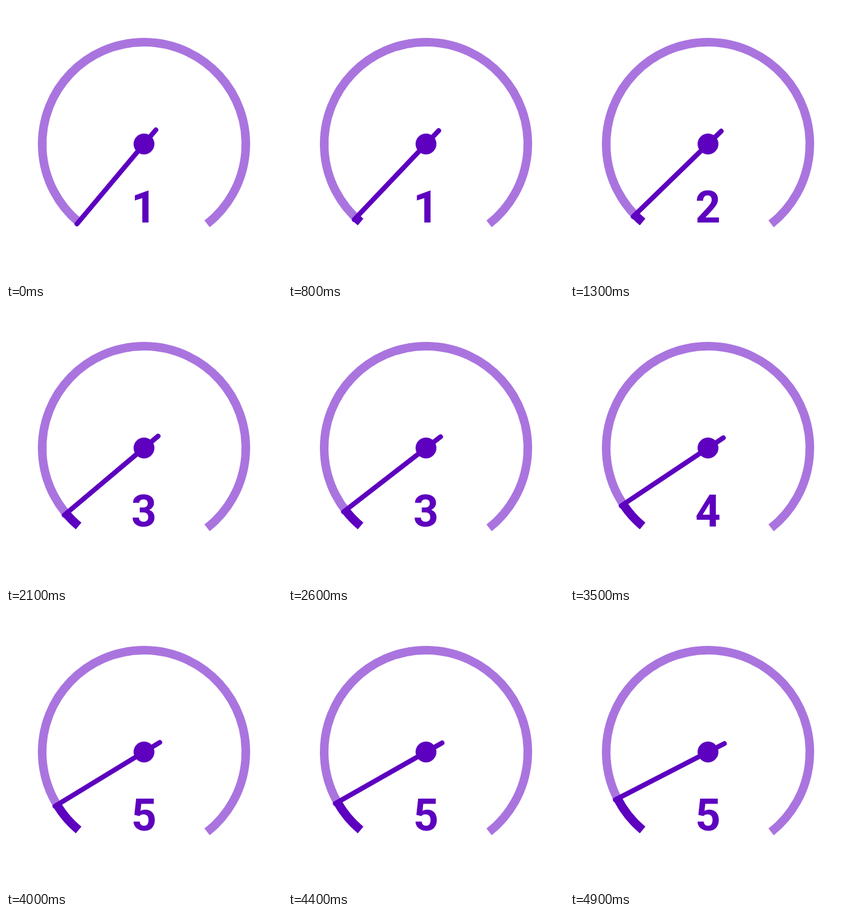
An HTML page for the animation above (5000 ms loop, 450x450 px).

```html
<!DOCTYPE html>
<html lang="en">
<head>
<meta charset="utf-8">
<title>Gauge</title>
<style>
  html, body { margin: 0; width: 100%; height: 100%; overflow: hidden; background: #fff; }
  svg { display: block; width: 100vw; height: 100vh; }
  path { fill: none; stroke-width: 14; }
  #track { stroke: #aa74df; }
  #fill { stroke: #5d00bf; }
  #needle { stroke: #5d00bf; stroke-width: 8; stroke-linecap: round; }
  circle, text { fill: #5d00bf; }
  text { font: 700 72px Roboto, sans-serif; text-anchor: middle; }
</style>
</head>
<body>
<svg viewBox="0 0 450 450">
  <path id="track"/>
  <path id="fill"/>
  <line id="needle" x1="225" y1="195" x2="225" y2="395"/>
  <circle cx="225" cy="225" r="17"/>
  <text id="label" x="225" y="353">1</text>
</svg>
<script>
  const C = 225, R = 166;
  const START = 40;           // degrees clockwise from straight down
  const RATE = 280 / 60;      // degrees per second
  const LOOP = 5000, FPS = 8;
  const [track, fill, needle, label] =
    ['track', 'fill', 'needle', 'label'].map(id => document.getElementById(id));

  function point(deg) {
    const a = deg * Math.PI / 180;
    return `${C - R * Math.sin(a)} ${C + R * Math.cos(a)}`;
  }

  function arc(sweep) {
    if (!sweep) return '';
    return `M${point(START)}A${R} ${R} 0 ${+(sweep > 180)} 1 ${point(START + sweep)}`;
  }

  // Eight poses per second, each shown on the nearest tenth of a second.
  function poseTime(ms) {
    const slot = Math.floor(ms / 100);
    return (Math.ceil((slot + 0.5) / 1.25) - 1) / FPS;
  }

  function draw(ms) {
    const s = poseTime(ms % LOOP);
    const sweep = s * RATE;
    fill.setAttribute('d', arc(sweep));
    needle.setAttribute('transform', `rotate(${START + sweep} ${C} ${C})`);
    label.textContent = Math.floor(s) + 1;
  }

  track.setAttribute('d', arc(281.7));
  draw(0);
  let begin;
  requestAnimationFrame(function tick(now) {
    begin ??= now;
    draw(now - begin);
    requestAnimationFrame(tick);
  });
</script>
</body>
</html>
```
